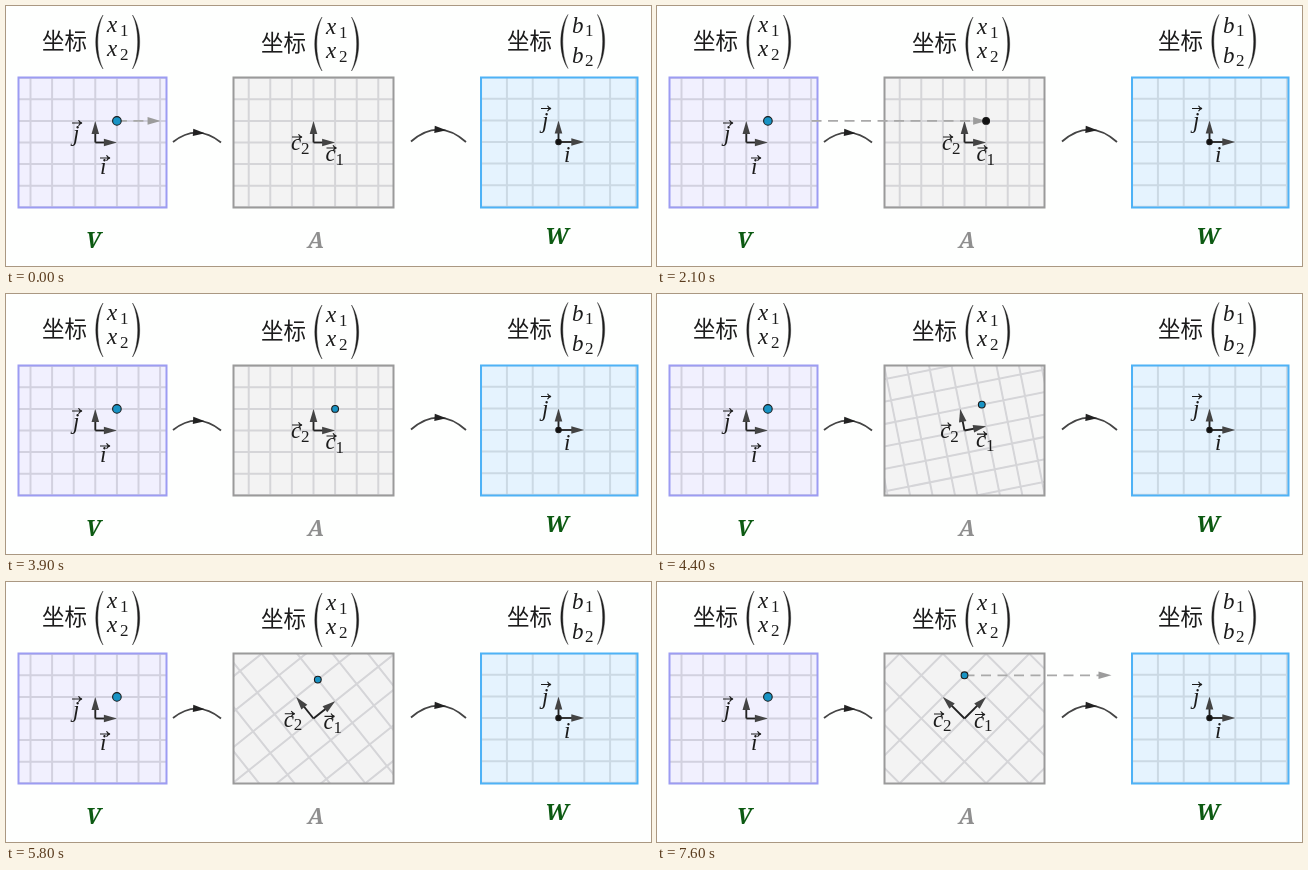
An HTML page for the animation above (8 s loop, 645 by 260 pixels).

```html
<!DOCTYPE html>
<html lang="zh">
<head>
<meta charset="utf-8">
<title>Linear map</title>
<style>
  html, body { margin: 0; width: 100%; height: 100%; overflow: hidden; background: #fefffe; }
  svg { display: block; width: 645px; height: 260px; }
  text { font-family: "Liberation Serif", serif; font-size: 23px; fill: #1c1c1c; }
  .var { font-style: italic; }
  .sub { font-size: 17px; }
  .cjk { font: 300 22.5px "Noto Sans CJK SC", "Noto Sans CJK", sans-serif; }
  .name { font: italic bold 22px "Noto Serif", serif; }
</style>
</head>
<body>
<svg viewBox="0 0 645 260"><g id="under"></g><g id="moving"></g><g id="over"></g></svg>
<script>
const LOOP = 8000;
const STEPS = [0, 300, 800, 1200, 1700, 2100, 2600, 3000, 3500,
               3900, 4400, 4900, 5300, 5800, 6200, 6700, 7200, 7600];
const UNIT = 21.6, TOP = 71.5, BOTTOM = 201.5;
const V = { x: 89.3, y: 136.5, left: 12.5, right: 160.5, ux: UNIT, fill: '#f1f0fe', line: '#d2d1df', edge: '#9c9cf2' };
const A = { x: 307.5, y: 136.5, left: 227.5, right: 387.5, ux: UNIT, fill: '#f3f3f3', line: '#d5d5d8', edge: '#9a9a9a' };
const W = { x: 552.5, y: 136, left: 475, right: 631.5, ux: 25.8, fill: '#e5f3fe', line: '#cbd9e4', edge: '#4eb2f6' };

const text = (x, y, s, cls, extra = '') => `<text x="${x}" y="${y}" class="${cls}" ${extra}>${s}</text>`;
const path = (d, stroke, width = 2, extra = '') =>
  `<path d="${d}" fill="none" stroke="${stroke}" stroke-width="${width}" ${extra}/>`;
const dot = (x, y, r, fill) =>
  `<circle cx="${x}" cy="${y}" r="${r}" fill="${fill}" stroke="#1a1a1a" stroke-width="1.1"/>`;

function head(x, y, angle, color, length = 13, half = 3.8) {
  return `<path d="M0 0L${-length} ${-half}V${half}z" fill="${color}"
    transform="translate(${x} ${y}) rotate(${angle})"/>`;
}

function arrow(x, y, dx, dy, color = '#444', shaft = '#222', dash = '') {
  const size = Math.hypot(dx, dy), keep = Math.max(0, 1 - 12 / size);
  return path(`M${x} ${y}l${dx * keep} ${dy * keep}`, shaft, 1.8, dash && `stroke-dasharray="${dash}"`) +
    head(x + dx, y + dy, Math.atan2(dy, dx) * 180 / Math.PI, color);
}

const dashedArrow = (from, to, y) => arrow(from, y, to - from, 0, '#9c9c9c', '#a9a9a9', '10 6.5');

const vecMark = (x, y) => path(`M${x} ${y}h10m-3.5 -2.8q1 2.2 3.5 2.8q-2.5 .6 -3.5 2.8`, '#1c1c1c', 1.1);

// Panel whose grid is sheared by t: c1 = (1, t), c2 = (-t, 1)
function panel(p, t = 0) {
  const box = `x="${p.left}" y="${TOP}" width="${p.right - p.left}" height="${BOTTOM - TOP}"`;
  const id = `clip${p.left | 0}`;
  let grid = '';
  for (let k = -7; k <= 7; k++) {
    grid += `M${k * p.ux} -160V160M-190 ${k * UNIT}H190`;
  }
  return `<clipPath id="${id}"><rect ${box}/></clipPath><rect ${box} fill="${p.fill}"/>
    <g clip-path="url(#${id})"><g transform="matrix(1 ${-t} ${t} 1 ${p.x} ${p.y})">
    ${path(grid, p.line, 2, 'vector-effect="non-scaling-stroke"')}</g></g>
    <rect ${box} fill="none" stroke="${p.edge}" stroke-width="2"/>`;
}

const basis = (p, t = 0) =>
  arrow(p.x, p.y, p.ux, -t * UNIT) + arrow(p.x, p.y, -t * UNIT, -UNIT);

function paren(x, y, mirror) {
  return `<path d="M7 0C-2.6 14 -2.6 40 7 54C0 40 0 14 7 0z" fill="#1c1c1c" stroke="#1c1c1c"
    stroke-width=".4" transform="translate(${x} ${y}) scale(${mirror ? -1 : 1} 1)"/>`;
}

function heading(x, y, letter, row1, row2) {
  const entry = (row, n) => text(x + 65, row, letter, 'var') + text(x + 78, row + 3.5, n, 'sub');
  return text(x, y + 43, '坐标', 'cjk') + paren(x + 54, y + 9) + paren(x + 97.5, y + 9, true) +
    entry(y + row1, 1) + entry(y + row2, 2);
}

const cLabel = (x, y, n) =>
  text(x, y, 'c', 'var') + text(x + 10, y + 3.5, n, 'sub') + vecMark(x + 1, y - 13);

function link(x, y, end, peak) {
  const mid = (x + end) / 2;
  return path(`M${x} ${y}Q${mid} ${2 * peak - y} ${end} ${y + .5}`, '#444', 1.8) +
    head(mid + 8, peak + .8, 4, '#222', 12, 3.6);
}

function moving(step) {
  const t = Math.min(Math.max((step - 9) / 5, 0), 1);
  const px = A.x + (1 - t) * UNIT, py = A.y - (1 + t) * UNIT;
  let out = panel(A, t) + basis(A, t) +
    cLabel(319.5 - 2.5 * t, 155 - 9.5 * t, 1) + cLabel(285 - 9 * t, 144 + t, 2);
  if (step < 9) {
    const start = V.x + UNIT, span = px - start;
    const from = Math.max(0, step - 4) / 5, to = Math.min(1, (step + 1) / 5);
    out += dashedArrow(start + from * span, start + to * span, py);
  } else if (step > 14) {
    out += dashedArrow(px, px + (step - 14) / 5 * (W.x - px), py);
  }
  if (step > 3) out += dot(px, py, 3.4, step < 9 ? '#111' : '#1893c4');
  return out + dot(V.x + UNIT, V.y - UNIT, 4.3, '#1893c4');
}

const byId = id => document.getElementById(id);
byId('under').innerHTML = panel(V) + panel(W) + basis(V) + basis(W) +
  link(167, 136, 215, 126.5) + link(405, 135.5, 460, 123.5);
byId('over').innerHTML = dot(W.x, W.y, 2.7, '#111') +
  text(67, 135, 'j', 'var') + vecMark(66, 117) +
  text(94, 168, 'i', 'var') + vecMark(94, 152) +
  text(536, 122, 'j', 'var') + vecMark(535, 102.5) + text(558, 156, 'i', 'var') +
  heading(36, 0, 'x', 26, 50) + heading(255, 2, 'x', 26, 50) + heading(501, -.5, 'b', 27, 57) +
  text(79.5, 242, 'V', 'name', 'style="fill:#0c5a12"') +
  text(301.5, 242, 'A', 'name', 'style="fill:#8f8f8f"') +
  text(539, 238, 'W', 'name', 'style="fill:#0c5a12"');

let shown = -1;
const begin = performance.now();
function draw() {
  const time = Math.max(0, performance.now() - begin) % LOOP;
  const step = STEPS.filter(s => s <= time).length - 1;
  if (step !== shown) byId('moving').innerHTML = moving(shown = step);
  requestAnimationFrame(draw);
}
draw();
</script>
</body>
</html>
```
